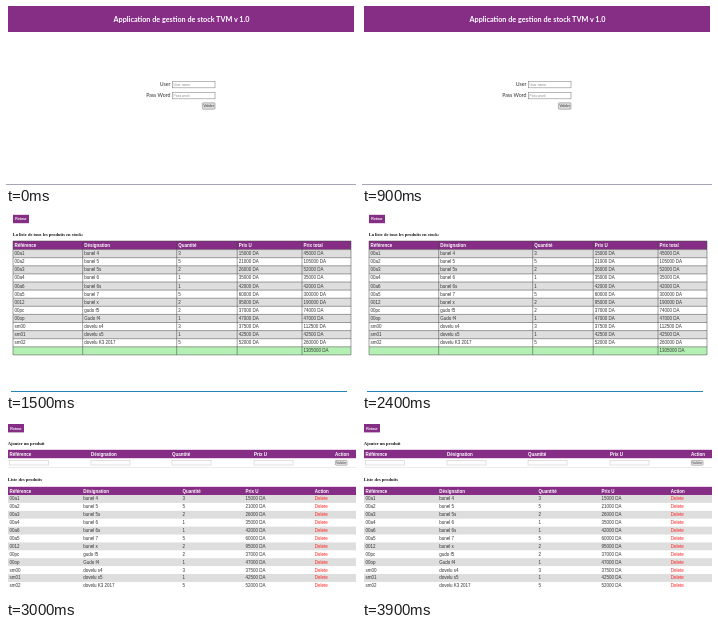
These frames come from a looping animation (350x179 px, 4500 ms). An HTML page:

```html
<!DOCTYPE html>
<html lang="fr">
<head>
<meta charset="utf-8">
<style>
  html, body { margin: 0; width: 100%; height: 100%; overflow: hidden; background: #fff; }
  svg { display: block; width: 100%; height: 100%; }
  text { font: 4.5px "Liberation Sans", Arial, sans-serif; fill: #333; }
  .head { font-weight: bold; fill: #fff; }
  .title { font: bold 4.5px "Liberation Serif", serif; fill: #111; }
  .banner { font: bold 7.25px Lato, sans-serif; fill: #fff; }
  .label { font: 5.25px Lato, sans-serif; }
  .hint { font-size: 3.4px; fill: #888; }
  .tiny { font-size: 3.5px; }
  .delete { fill: #f22; }
</style>
</head>
<body>
<svg viewBox="0 0 350 179"><g id="login"></g><g id="stock"></g><g id="edit"></g></svg>
<script>
const PURPLE = '#862d86', GREY = '#dedede', SCREEN_MS = 1500;

const products = [
  ['00a1', 'bunel 4', 3, 15000], ['00a2', 'bunel 5', 5, 21000],
  ['00a3', 'bunel 5s', 2, 26000], ['00a4', 'bunel 6', 1, 35000],
  ['00a6', 'bunel 6s', 1, 42000], ['00a5', 'bunel 7', 5, 60000],
  ['0012', 'bunel x', 2, 95000], ['00pc', 'gudo f5', 2, 37000],
  ['00op', 'Gudo f4', 1, 47000], ['sm00', 'dovelu s4', 3, 37500],
  ['sm01', 'dovelu s5', 1, 42500], ['sm02', 'dovelu K3 2017', 5, 52000]
];

const rect = (x, y, w, h, fill, stroke = 'none', rx = 0) =>
  `<rect x="${x}" y="${y}" width="${w}" height="${h}" rx="${rx}" fill="${fill}" stroke="${stroke}" stroke-width=".6"/>`;
const text = (x, y, s, cls = '', anchor = 'start') =>
  `<text x="${x}" y="${y}" class="${cls}" text-anchor="${anchor}">${s}</text>`;
const cells = (xs, y, values, cls) => values.map((v, i) => text(xs[i], y, v, cls)).join('');
const input = (x, y, w, h, stroke) => rect(x, y, w, h, '#fff', stroke);
const button = (x, y, w, h, fill) =>
  rect(x, y, w, h, fill, '#888', .8) + text(x + w / 2, y + h / 2 + 1.2, 'Valider', 'tiny', 'middle');
const back = (x, y) => rect(x, y, 16, 8.4, PURPLE) + text(x + 8, y + 5.5, 'Retour', 'head tiny', 'middle');

function table(x, y, w, headH, pitch, xs, heads, rows) {
  let out = rect(x, y, w, headH, PURPLE) + cells(xs, y + headH / 2 + 1.6, heads, 'head');
  rows.forEach((row, i) => {
    const top = y + headH + i * pitch;
    if (i % 2 === 0) out += rect(x, top, w, pitch, GREY);
    out += cells(xs, top + pitch / 2 + 1.5, row);
  });
  return out;
}

function grid(x, y, w, headH, pitch, xs, count) {
  const bottom = y + headH + count * pitch;
  let d = `M${x} ${y}h${w}V${bottom}`;
  for (let i = 0; i <= count; i++) d += `M${x} ${y + headH + i * pitch}h${w}`;
  for (const left of xs) d += `M${left - 1.5} ${y}V${bottom}`;
  return `<path d="${d}" fill="none" stroke="#444" stroke-width=".5"/>`;
}

const field = (y, label, hint) =>
  text(164.5, y + 5, label, 'label', 'end') + input(166.4, y + .4, 42.6, 6.4, '#888') + text(167.6, y + 4.7, hint, 'hint');

login.innerHTML = rect(2, 0, 346, 26, PURPLE)
  + text(175.5, 15.6, 'Application de gestion de stock TVM v 1.0', 'banner', 'middle')
  + field(75, 'User', 'User name') + field(86, 'Pass Word', 'Pass word')
  + button(196.4, 96.8, 12.6, 6.4, '#ddd')
  + rect(0, 178, 350, 1, '#a9a4b5');

const stockCols = [8.5, 78.2, 172.2, 232.7, 297.5];
const stockBox = [7, 28, 338, 8.6, 8.1, stockCols];
const total = products.reduce((sum, [, , n, price]) => sum + n * price, 0);
stock.innerHTML = back(7, 1.8)
  + text(6.7, 23, 'La liste de tous les produits en stock:', 'title')
  + table(...stockBox, ['Référence', 'Désignation', 'Quantité', 'Prix U', 'Prix total'],
      products.map(([ref, name, n, price]) => [ref, name, n, price + ' DA', n * price + ' DA']))
  + rect(7, 133.8, 338, 8.1, '#b4efb4') + text(297.5, 139.4, total + ' DA')
  + grid(...stockBox, products.length + 1)
  + rect(5, 178, 336, 1, '#2585b5');

const formCols = [3.6, 85, 166, 248, 329];
const editCols = [3.6, 77.3, 176.5, 239.5, 308.7];
const editHeads = ['Référence', 'Désignation', 'Quantité', 'Prix U', 'Action'];
edit.innerHTML = back(2, 4)
  + text(1.8, 24.6, 'Ajouter un produit', 'title')
  + table(2, 29.8, 348, 8.4, 0, formCols, editHeads, [])
  + formCols.slice(0, 4).map(x => input(x, 40.4, 39, 4.6, '#ccc')).join('')
  + button(329.4, 40.4, 11.6, 4.8, '#eee')
  + rect(2, 47.4, 348, .4, '#ccc')
  + text(1.8, 61, 'Liste des produits', 'title')
  + table(2, 66.8, 348, 8.2, 7.9, editCols, editHeads,
      products.map(([ref, name, n, price]) =>
        [ref, name, n, price + ' DA', '<tspan class="delete">Delete</tspan>']));

const screens = [login, stock, edit];
function draw(now) {
  const current = Math.floor(now / SCREEN_MS) % screens.length;
  screens.forEach((s, i) => s.style.display = i === current ? '' : 'none');
  requestAnimationFrame(draw);
}
draw(performance.now());
</script>
</body>
</html>
```
